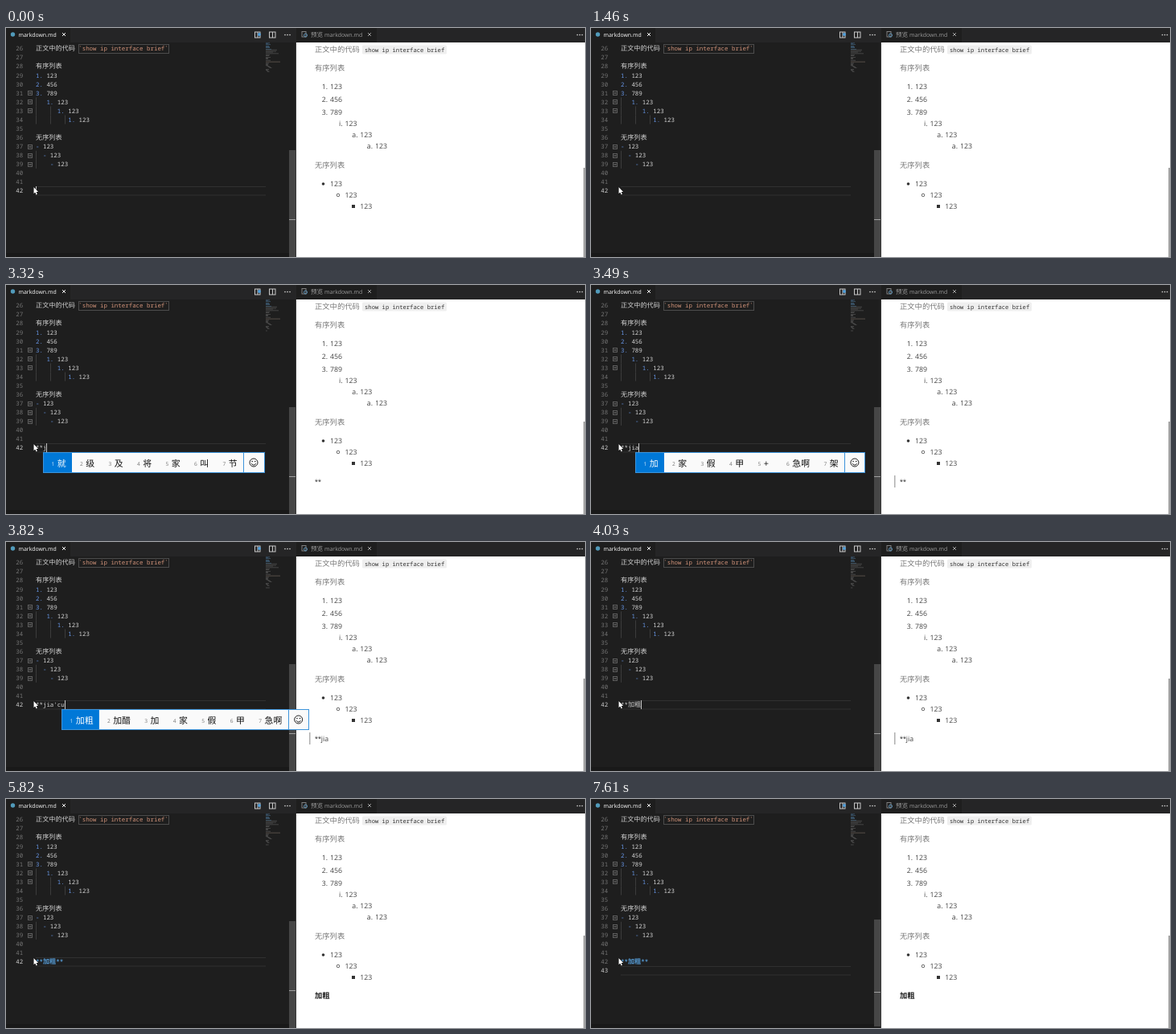
Write an HTML page with a canvas that moves like this. It is 720 by 285 pixels and loops after 8 s.

```html
<!DOCTYPE html>
<html lang="zh">
<head>
<meta charset="utf-8">
<title>Editor with live preview</title>
<style>
html, body { margin: 0; width: 100%; height: 100%; overflow: hidden; background: #1e1e1e; }
canvas { display: block; }
</style>
</head>
<body>
<canvas id="stage" width="720" height="285"></canvas>
<script>
const ctx = document.getElementById('stage').getContext('2d');
const LOOP = 8000;
const ROW = 11.06, LEFT = 37, COL = 4.47;
const BLUE = '#6796e6', PLAIN = '#d4d4d4', BOLD = '#569cd6';

const HAN = '"Noto Sans CJK SC", "Noto Sans CJK", sans-serif';
const style = (latin, latinSize, hanSize) => ({
  latin: `${latinSize}px ${latin}`, han: `${hanSize}px ${HAN}`
});
const CODE = style('"Noto Sans Mono", "DejaVu Sans Mono", monospace', 7.45, 8.13);
const INLINE = style('"Noto Sans Mono", "DejaVu Sans Mono", monospace', 7.2, 8);
const PROSE = style('"Open Sans", sans-serif', 8.75, 9.3);
const STARS = style('Roboto, sans-serif', 9, 9.3);
const TAB = style('"Open Sans", sans-serif', 6.95, 7.6);
const IME = style('"Open Sans", sans-serif', 10.9, 10.9);
const IME_KEY = style('"Open Sans", sans-serif', 6.6, 6.6);

// Line number -> [indent in columns, marker, rest]
const DOC = {
  28: [0, '', '有序列表'],
  29: [0, '1.', ' 123'],
  30: [0, '2.', ' 456'],
  31: [0, '3.', ' 789'],
  32: [3, '1.', ' 123'],
  33: [6, '1.', ' 123'],
  34: [9, '1.', ' 123'],
  36: [0, '', '无序列表'],
  37: [0, '-', ' 123'],
  38: [2, '-', ' 123'],
  39: [4, '-', ' 123']
};
const FOLDS = [31, 32, 33, 37, 38, 39];
const MAP_HEAD = [5, 3, 6, 0, 4, 5, 5, 0, 7, 14, 0, 13, 9, 0, 16, 0, 5, 4, 0, 6, 3, 3, 0, 6, 0];

// Label, label's right edge, text, text x, centre y
const ITEMS = [
  ['1.', 400, '123', 403, 73], ['2.', 400, '456', 403, 89], ['3.', 400, '789', 403, 105],
  ['i.', 418.5, '123', 421.5, 119], ['a.', 437.5, '123', 440.3, 133], ['a.', 456, '123', 459, 147],
  ['', 0, '123', 403, 194], ['', 0, '123', 421.5, 208], ['', 0, '123', 440.3, 222]
];

// Each entry changes part of the state from its time on.
const STEPS = [
  [0, { text: '', caret: true, view: '', mark: '', ime: '', line: 42, thumb: 174 }],
  [530, { caret: false }],
  [990, { caret: true }],
  [1460, { caret: false }],
  [2010, { caret: true }],
  [2180, { text: '*', mark: 'item' }],
  [2330, { text: '**' }],
  [2550, { view: '**', mark: '', thumb: 170 }],
  [2860, { caret: false }],
  [3320, { text: '**j', caret: true, ime: '就 级 及 将 家 叫 节' }],
  [3400, { text: '**ji', ime: '及 级 几 既 集 急 寄', mark: 'para' }],
  [3490, { text: '**jia', ime: '加 家 假 甲 + 急啊 架' }],
  [3640, { text: "**jia'c", ime: '加成 家产 加 家 假 甲 急啊' }],
  [3730, { text: "**jia'cu", ime: '加粗 加醋 加 家 假 甲 急啊' }],
  [3820, { view: '**jia' }],
  [4030, { text: '**加粗', ime: '' }],
  [4120, { view: "**jia'cu" }],
  [4430, { view: '**加粗', mark: '' }],
  [4580, { caret: false }],
  [5040, { caret: true }],
  [5210, { text: '**加粗*' }],
  [5290, { mark: 'para' }],
  [5360, { text: '**加粗**' }],
  [5440, { view: '加粗', mark: '' }],
  [5820, { caret: false }],
  [6130, { line: 43, caret: true }],
  [6680, { caret: false }],
  [7150, { caret: true }],
  [7610, { caret: false }]
];

const stateAt = t => Object.assign({}, ...STEPS.filter(s => s[0] <= t).map(s => s[1]));
const rowTop = n => 197 + (n - 42) * ROW;

function rect(x, y, w, h, color) {
  ctx.fillStyle = color;
  ctx.fillRect(x, y, w, h);
}

function frame(x, y, w, h, color, width = 1) {
  ctx.strokeStyle = color;
  ctx.lineWidth = width;
  ctx.strokeRect(x, y, w, h);
}

function path(points, color, width = 1) {
  ctx.beginPath();
  points.forEach(([x, y]) => ctx.lineTo(x, y));
  ctx.strokeStyle = color;
  ctx.lineWidth = width;
  ctx.stroke();
}

function disc(x, y, r, color) {
  ctx.beginPath();
  ctx.arc(x, y, r, 0, Math.PI * 2);
  ctx.fillStyle = color;
  ctx.fill();
}

// Draws mixed Latin and Chinese text and returns its right end.
function write(text, x, y, color, font, bold = false) {
  ctx.fillStyle = color;
  for (const part of text.match(/[\u2e80-\u9fff]+|[^\u2e80-\u9fff]+/g) || []) {
    const face = /[\u2e80-\u9fff]/.test(part) ? font.han : font.latin;
    ctx.font = (bold ? 'bold ' : '') + face;
    ctx.fillText(part, x, y);
    x += ctx.measureText(part).width;
  }
  return x;
}

function cross(x, y, color) {
  path([[x - 2, y - 2], [x + 2, y + 2]], color);
  path([[x + 2, y - 2], [x - 2, y + 2]], color);
}

function dots(x) {
  for (let i = -1; i <= 1; i++) disc(x + i * 3, 8.5, 0.85, '#d0d0d0');
}

function tabs() {
  rect(0, 0, 720, 18, '#252526');
  rect(0, 0, 80, 18, '#1e1e1e');
  rect(361, 0, 100, 18, '#1e1e1e');
  disc(8.5, 8, 2.7, '#519aba');
  write('markdown.md', 15.5, 11, '#ffffff', TAB);
  cross(72, 8, '#f0f0f0');

  frame(309.5, 5, 6.5, 7, '#c8c8c8');
  rect(312.5, 5, 1, 7, '#c8c8c8');
  disc(315, 8, 1.9, '#4f9fdc');
  frame(327.5, 5, 7.5, 7, '#c8c8c8');
  rect(331, 5, 1, 7, '#c8c8c8');
  dots(350);

  frame(368, 4.5, 5, 6.5, '#8a8a8a', 0.9);
  ctx.beginPath();
  ctx.arc(372.5, 9, 2, 0, Math.PI * 2);
  ctx.strokeStyle = '#5f93b8';
  ctx.lineWidth = 1;
  ctx.stroke();
  write('预览 markdown.md', 379, 11, '#9b9b9b', TAB);
  cross(452, 8, '#9b9b9b');
  dots(713.5);
}

function minimap(s) {
  const draw = (n, w, color) => rect(323, 18.5 + (n - 1) * 0.93, w, 0.7, color);
  MAP_HEAD.forEach((w, i) => draw(i + 1, w, i < 9 ? '#41617c' : '#555555'));
  draw(26, 18, '#6c6058');
  for (const [n, [indent, marker, rest]] of Object.entries(DOC)) {
    const cols = (marker + rest).replace(/[\u2e80-\u9fff]/g, '##').length;
    rect(323 + indent / 2, 18.5 + (n - 1) * 0.93, cols / 2, 0.7, '#555555');
  }
  draw(42, s.text.length * 0.6, '#555555');
}

function editor(s) {
  rect(0, 18, 360, 267, '#1e1e1e');
  rect(0, 280, 352, 5, '#191919');

  const active = Math.round(rowTop(s.line));
  rect(LEFT, active, 286, 1, '#303030');
  rect(LEFT, active + 10.5, 286, 1, '#303030');

  for (let n = 26; n <= s.line; n++) {
    write(String(n), 12.2, rowTop(n) + 8.3, n === s.line ? '#d0d0d0' : '#747474', CODE);
  }
  for (const n of FOLDS) {
    const y = Math.round(rowTop(n)) + 3.5;
    frame(27.5, y, 5, 5, '#666666', 0.9);
    rect(28.5, y + 2, 3, 1, '#8a8a8a');
  }
  for (const [n, [indent, marker, rest]] of Object.entries(DOC)) {
    for (let c = 0; c < indent; c += 4) {
      rect(Math.round(LEFT + c * COL), rowTop(n), 1, ROW, '#3c3c3c');
    }
    const x = write(marker, LEFT + indent * COL, rowTop(n) + 8.3, BLUE, CODE);
    write(rest, x, rowTop(n) + 8.3, PLAIN, CODE);
  }

  const y = rowTop(26) + 8.3;
  const codeX = write('正文中的代码 ', LEFT, y, PLAIN, CODE);
  const codeEnd = write('`show ip interface brief`', codeX, y, '#ce9178', CODE);
  frame(Math.round(codeX) + 0.5, 20.5, Math.round(codeEnd - codeX), 11, '#4c4c4c');

  const strong = /^\*\*.+\*\*$/.test(s.text);
  const end = write(s.text, LEFT, rowTop(42) + 8.3, strong ? BOLD : PLAIN, CODE, strong);
  const caretX = s.line === 42 ? end : LEFT;
  if (s.caret) rect(Math.round(caretX), active, 1, 11, '#c4c4c4');

  minimap(s);
  const shift = s.line === 43 ? 2 : 0;
  rect(352, 152 - shift, 8, 133, '#464646');
  rect(352, 238 + shift, 8, 1, '#a0a0a0');
  return caretX;
}

function preview(s) {
  rect(360, 0, 1, 285, '#3a3a3a');
  rect(361, 18, 359, 267, '#ffffff');
  const heading = '#777777', ink = '#444444';

  write('正文中的代码', 384, 30.3, heading, PROSE);
  ctx.beginPath();
  ctx.roundRect(443, 21.5, 105, 11, 1.5);
  ctx.fillStyle = '#efefef';
  ctx.fill();
  write('show ip interface brief', 446, 29.6, '#333333', INLINE);
  write('有序列表', 384, 52.6, heading, PROSE);
  write('无序列表', 384, 174.1, heading, PROSE);

  for (const [label, edge, text, x, y] of ITEMS) {
    ctx.textAlign = 'right';
    if (label) {
      ctx.font = PROSE.latin;
      ctx.fillStyle = ink;
      ctx.fillText(label, edge, y + 3.1);
    }
    ctx.textAlign = 'left';
    write(text, x, y + 3.1, ink, PROSE);
  }
  disc(394.5, 194, 1.8, '#333333');
  ctx.beginPath();
  ctx.arc(413, 208, 1.8, 0, Math.PI * 2);
  ctx.strokeStyle = '#444444';
  ctx.lineWidth = 0.8;
  ctx.stroke();
  rect(430, 220, 4, 4, '#333333');

  if (s.view.startsWith('**')) {
    const x = write('**', 384, 248, ink, STARS);
    const rest = s.view.slice(2);
    write(rest, x, 248, rest === '加粗' ? heading : ink, PROSE);
  } else {
    write(s.view, 384, 248.2, '#1c1c1c', PROSE, true);
  }
  if (s.mark === 'item') rect(423, 214, 1.5, 14, '#b0b0b0');
  if (s.mark === 'para') rect(377, 237, 1.5, 15, '#b0b0b0');
  rect(718, s.thumb, 2, 285 - s.thumb, '#a6a6a6');
}

function smiley(x, y) {
  ctx.strokeStyle = '#222222';
  ctx.lineWidth = 1;
  ctx.beginPath();
  ctx.arc(x, y, 5, 0, Math.PI * 2);
  ctx.stroke();
  ctx.beginPath();
  ctx.arc(x, y + 0.3, 2.8, 0.3, Math.PI - 0.3);
  ctx.stroke();
  disc(x - 1.8, y - 1.5, 0.8, '#222222');
  disc(x + 1.8, y - 1.5, 0.8, '#222222');
}

function candidates(list, caretX) {
  const words = list.split(' ');
  const widths = words.map(w => 24.6 + 10.9 * w.length);
  const left = Math.round(caretX - 4) + 0.5;
  const split = left + widths.reduce((a, b) => a + b);
  rect(left, 208.5, split - left + 26, 25, '#fafafa');
  let x = left;
  words.forEach((word, i) => {
    if (!i) rect(x, 208.5, widths[0], 25, '#0078d7');
    write(String(i + 1), x + 10, 225.3, i ? '#777777' : '#d5e8f8', IME_KEY);
    write(word, x + 17.3, 226, i ? '#111111' : '#ffffff', IME);
    x += widths[i];
  });
  frame(left, 208.5, Math.round(split - left) + 26, 25, '#3d94db');
  rect(Math.round(split), 208.5, 1, 25, '#3d94db');
  smiley(split + 13, 221);
}

function pointer(x, y) {
  const shape = [[0, 0], [0, 8.2], [1.8, 6.6], [3.1, 9.4], [4.4, 8.8], [3.2, 6.1], [5.6, 6]];
  ctx.beginPath();
  shape.forEach(([dx, dy]) => ctx.lineTo(x + dx, y + dy));
  ctx.closePath();
  ctx.strokeStyle = '#000000';
  ctx.lineWidth = 1;
  ctx.stroke();
  ctx.fillStyle = '#ffffff';
  ctx.fill();
}

function render(now) {
  const s = stateAt(now % LOOP);
  ctx.textRendering = 'geometricPrecision';
  const caretX = editor(s);
  preview(s);
  tabs();
  if (s.ime) candidates(s.ime, caretX);
  pointer(34.5, 198);
}

const start = performance.now();
function tick() {
  render(performance.now() - start);
  requestAnimationFrame(tick);
}
tick();
</script>
</body>
</html>
```
